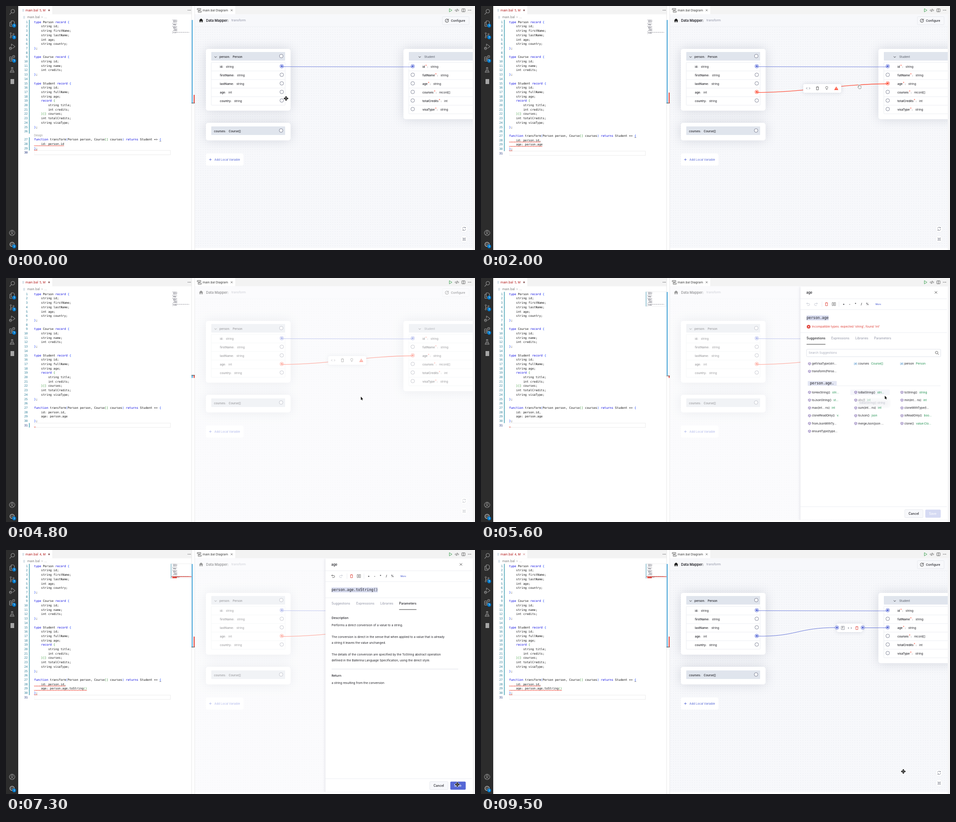
These frames come from a looping animation (1035 px wide and 541 px high, 9600 ms). An HTML page with a canvas:

```html
<!DOCTYPE html>
<html lang="en">
<head>
<meta charset="utf-8">
<title>Data Mapper</title>
<style>
html, body { margin: 0; width: 100%; height: 100%; overflow: hidden; background: #fff; }
canvas { display: block; width: 1035px; height: 541px; }
</style>
</head>
<body>
<canvas id="stage"></canvas>
<script>
const LOOP = 9600, W = 1035, H = 541;
const SANS = 'Inter, sans-serif', MONO = '"DejaVu Sans Mono", monospace';
const BLUE = '#5567d5', RED = '#fe523c', CYAN = '#36b4e0', INK = '#222228', GREY = '#8d91a3', GREEN = '#1d8f4e';
const canvas = document.getElementById('stage'), c = canvas.getContext('2d');
const dpr = window.devicePixelRatio || 1;
canvas.width = W * dpr;
canvas.height = H * dpr;

const RECORDS = `type Person record {
    string id;
    string firstName;
    string lastName;
    int age;
    string country;
};

type Course record {
    string id;
    string name;
    int credits;
};

type Student record {
    string id;
    string fullName;
    string age;
    record {
        string title;
        int credits;
    }[] courses;
    int totalCredits;
    string visaType;
};

function transform(Person person, Course[] courses) returns Student => {
    id: person.id`;
const CODE = ['', ',\n    age: person.age', ',\n    age: person.age.toString()']
  .map(tail => (RECORDS + tail + '\n};\n').split('\n'));

const during = (t, a, b) => t >= a && t < b;
const ramp = (t, a, b) => Math.min(1, Math.max(0, (t - a) / (b - a)));
const ease = p => p * p * (3 - 2 * p);

// ---- drawing helpers ----
function rect(x, y, w, h, fill, r = 0, stroke) {
  c.beginPath();
  c.roundRect(x, y, w, h, r);
  if (fill) { c.fillStyle = fill; c.fill(); }
  if (stroke) { c.strokeStyle = stroke; c.lineWidth = .7; c.stroke(); }
}
function text(s, x, y, { size = 6.4, color = INK, weight = 400, font = SANS, align = 'left' } = {}) {
  c.font = `${weight} ${size}px ${font}`;
  c.fillStyle = color;
  c.textAlign = align;
  c.fillText(s, x, y + size * .35);
  return x + c.measureText(s).width;
}
function line(x1, y1, x2, y2, color = '#e3e5ec', width = .7) {
  c.beginPath();
  c.moveTo(x1, y1);
  c.lineTo(x2, y2);
  c.strokeStyle = color;
  c.lineWidth = width;
  c.stroke();
}
function circle(x, y, r, fill, stroke, width = .9) {
  c.beginPath();
  c.arc(x, y, r, 0, 7);
  if (fill) { c.fillStyle = fill; c.fill(); }
  if (stroke) { c.strokeStyle = stroke; c.lineWidth = width; c.stroke(); }
}
function icon(x, y, d, { stroke, fill, width = .9 }) {
  const path = new Path2D(d);
  c.save();
  c.translate(x, y);
  c.lineWidth = width;
  if (stroke) { c.strokeStyle = stroke; c.stroke(path); }
  if (fill) { c.fillStyle = fill; c.fill(path); }
  c.restore();
}
function shadowBox(x, y, w, h, r, blur = 24) {
  c.save();
  c.shadowColor = 'rgba(90,98,125,.22)';
  c.shadowBlur = blur * dpr;
  rect(x, y, w, h, '#fff', r);
  c.restore();
}
function curve(x1, y1, cx1, cx2, x2, y2, color, width = .9) {
  c.beginPath();
  c.moveTo(x1, y1);
  c.bezierCurveTo(cx1, y1 + 1.5, cx2, y2, x2, y2);
  c.strokeStyle = color;
  c.lineWidth = width;
  c.stroke();
}

const D = {
  cross: 'M-2-2L2 2M2-2L-2 2',
  angles: 'M-2-2L-4 0L-2 2M2-2L4 0L2 2',
  trash: 'M-3-2.8H3M-1-3.6H1M-2.2-2.6V3.4H2.2V-2.6',
  bulb: 'M-1.2 1.8C-1.2.6-2.4 0-2.4-1.3A2.4 2.4 0 0 1 2.4-1.3C2.4 0 1.2.6 1.2 1.8ZM-1.2 3.3H1.2',
  warn: 'M0-4L4.6 3.8H-4.6Z',
  chevron: 'M-2.4-1.2L0 1.2L2.4-1.2',
  undo: 'M-1.5-3.5L-3.5-1.5L-1.5.5M-3.5-1.5H1A2.2 2.2 0 0 1 1 3H-2',
  redo: 'M1.5-3.5L3.5-1.5L1.5.5M3.5-1.5H-1A2.2 2.2 0 0 0-1 3H2',
  cube: 'M0-3L2.7-1.5V1.5L0 3L-2.7 1.5V-1.5ZM-2.7-1.5L0 0L2.7-1.5M0 0V3',
  files: 'M-2-6H3L5-4V3H-2ZM-2-3H-5V6H2V3',
  branch: 'M-3-3V3M3-1C3 2-3 0-3 3M-3-6a1.5 1.5 0 1 0 .01 0M-3 3a1.5 1.5 0 1 0 .01 0M3-4a1.5 1.5 0 1 0 .01 0',
  debug: 'M-2-1V-6L6 0L0 4M-4 1a2.4 2.4 0 0 1 2.4 2.4v1a2.4 2.4 0 0 1-4.8 0v-1A2.4 2.4 0 0 1-4 1M-7 3.5H-1',
  blocks: 'M-5-3H0V6H-5ZM-5 1.5H5V6H0M2-6H6V-2H2Z',
  flask: 'M-2-5.5H2M-1.3-5.5V-1L-4.6 5H4.6L1.3-1V-5.5M-3 2H3',
  home: 'M-4.6 0L0-4.2L4.6 0H3.3V4H1V1H-1V4H-3.3V0Z',
  refresh: 'M-3.4-.6A3.4 3.4 0 0 1 2.6-2.4M3.4.6A3.4 3.4 0 0 1-2.6 2.4M3-4V-2H1M-3 4V2H-1',
  shrink: 'M-3.5-3.5L-1-1V-3M-1-1H-3M3.5-3.5L1-1V-3M1-1H3M-3.5 3.5L-1 1V3M-1 1H-3M3.5 3.5L1 1V3M1 1H3'
};

// ---- editor ----
function sideBar(dirty) {
  rect(0, 0, 27, H, '#2c2c2c');
  const look = { stroke: '#a5a5a5', width: 1 };
  circle(15, 11.5, 4, null, '#a5a5a5', 1);
  line(12, 14.5, 8, 19, '#a5a5a5', 1.1);
  icon(13.5, 39, D.files, look);
  icon(13.5, 65, D.branch, look);
  icon(14, 90, D.debug, look);
  icon(13, 116, D.blocks, look);
  icon(13.5, 142, D.flask, look);
  rect(10, 162, 8, 11, '#a5a5a5');
  circle(13.5, 503, 6, null, '#a5a5a5', 1);
  circle(13.5, 501, 2.3, null, '#a5a5a5', 1);
  icon(13.5, 507, 'M-4 1C-3-3 3-3 4 1', look);
  circle(13.5, 528.5, 4.6, null, '#a5a5a5', 1.8);
  circle(13.5, 528.5, 1.8, null, '#a5a5a5', 1);
  for (const y of [43.5, 69.5, 121.5, 533]) {
    if (y < 50 && !dirty) continue;
    circle(18, y, 4.2, '#007acc');
    text('1', 18, y, { size: 5.2, color: '#fff', weight: 600, align: 'center' });
  }
}
function fileIcon(x, y) {
  for (const dy of [-2, 0, 2]) line(x - 2, y + dy, x + 2, y + dy, '#a9bfd0', .8);
}
function codeLine(s, x, y, state) {
  for (const { 0: part, index } of s.matchAll(/\w+|[{}()[\]]|[^\w\s{}()[\]]+/g)) {
    let color = /^(type|record|function|returns)$/.test(part) ? '#0000e0' : '#111';
    if (/[})\]]/.test(part)) state.depth--;
    if (/[{}()[\]]/.test(part)) color = state.depth ? '#319331' : '#0431fa';
    if (/[{([]/.test(part)) state.depth++;
    text(part, x + index * 3.895, y, { size: 6.47, color, font: MONO });
  }
}
function squiggle(x1, x2, y) {
  c.beginPath();
  for (let x = x1, i = 0; x <= x2; x += 1.2, i++) c.lineTo(x, y + (i % 2 ? .7 : -.7));
  c.strokeStyle = '#e51400';
  c.lineWidth = .7;
  c.stroke();
}
function editor(t) {
  const lines = CODE[t < 1700 ? 0 : t < 6500 ? 1 : 2], last = lines.length;
  const dirty = t < 2700 || during(t, 4500, 9300);
  const fresh = during(t, 4500, 4900), clean = during(t, 4500, 6500);
  const lens = t < 1700 ? 8.3 : 0;
  const lineY = i => 35.5 + (i - 1) * 9.7 + (i > 26 ? lens : 0);

  sideBar(dirty);
  rect(27, 0, 383, 18.5, '#f3f3f3');
  rect(27, 0, 75, 18.5, '#fff');
  fileIcon(38, 9.5);
  text('main.bal', 43, 9.5, { size: 7, color: '#b01011' });
  text(t < 6500 ? '5, M' : '4, M', 74, 9.5, { size: 6.4, color: '#b01011' });
  if (dirty) circle(95, 9.5, 2, '#9c7272');
  else icon(95, 9.5, D.cross, { stroke: '#c07070', width: .8 });
  text('···', 404.5, 9.5, { size: 8, weight: 700, align: 'center' });
  fileIcon(40, 25);
  text('main.bal  ›  ...', 47, 25, { size: 6.9, color: '#777' });

  rect(62, lineY(last) - 4.8, 301, 9.5, null, 0, '#e4e4e4');
  rect(61, lineY(last) - 6, 1.4, 12, '#fff');
  const state = { depth: 0 };
  lines.forEach((s, k) => {
    const n = k + 1, y = lineY(n);
    text(n, 48, y, { size: 6.47, color: n === last ? '#0b216f' : '#237893', font: MONO, align: 'right' });
    if (fresh ? n === last : n < last) rect(50.7, y - 4.85, 1.6, 9.75, '#4aa3b5');
    codeLine(s, 62, y, state);
    for (const { 0: word, index } of s.matchAll(/\S+/g))
      rect(367 + index * .53, 30.6 + k * 1.05, word.length * .53, .65, '#7d7d88');
    if (n > 27 && n < last && !clean && !during(t, 7400, 8000))
      squiggle(62, 62 + s.length * 3.895, y + 4.2);
  });
  if (lens) text('Design', 62, 287, { size: 5.8, color: '#919191' });
  if (clean) squiggle(62, 66, lineY(last) + 4);
  else line(338.5, lineY(27) + 4, 342.5, lineY(27) + 4, '#555');

  // minimap marks and overview ruler
  if (t >= 2700 && !fresh) {
    rect(364.3, 30.5, 45, 32, null, 0, '#e8e8ea');
    line(364.3, 30.5, 364.3, 63, '#3793b0', .9);
    if (!clean && !during(t, 7400, 8000)) {
      rect(365, 58.6, 45, 1.2, '#e03a30');
      rect(367, 60.5, 10, 1.8, '#e51400');
    }
  }
  line(409.7, 0, 409.7, H, '#ddd');
  line(416.6, 0, 416.6, H, '#ddd');
  if (fresh) {
    rect(409.5, 215.5, 3, 6, '#5fb0dc');
    rect(414, 215.5, 2.3, 6, '#e04a40');
    line(409.5, 215.7, 416.5, 215.7, '#333', 1);
  } else {
    rect(409.7, 31, 2.5, 185, '#62b3e0');
    const top = clean ? 217 : t < 1700 ? 197 : 192;
    rect(414, top, 2.4, clean ? 4.5 : 215 - top, '#e8574e');
    line(409.5, clean ? 217 : 215.2, 416.5, clean ? 217 : 215.2, '#333', 1);
  }
}

// ---- diagram ----
function port(x, y, color) {
  circle(x, y, 4, '#fff', color || '#70748a');
  if (color) circle(x, y, 2.3, color);
}
function topBar() {
  rect(417, 0, 618, 18.5, '#f3f3f3');
  rect(417, 0, 89, 18.5, '#fff');
  rect(422, 5.5, 8, 3, null, .5, '#222');
  rect(424, 11, 7, 3, null, .5, '#222');
  line(426, 8.5, 426, 11, '#222');
  text('main.bal Diagram', 434, 9.5, { size: 6.8, color: '#333' });
  icon(498, 9.5, D.cross, { stroke: '#444', width: .8 });
  icon(981, 9.5, 'M-2.6-3.6L3.2 0L-2.6 3.6Z', { stroke: '#38a04d' });
  icon(995, 9.5, D.angles + 'M1-3.2L-1 3.2', { stroke: '#333' });
  rect(1006, 6.2, 7, 6.6, null, .5, '#333');
  line(1009.5, 6.2, 1009.5, 12.8, '#333');
  text('···', 1023, 9.5, { size: 8, weight: 700, align: 'center' });
}
function fieldRows(x, w, rows, y = 125, pitch = 19) {
  rect(x, y, w, rows * pitch, null, 1, '#e3e5ec');
  for (let i = 1; i < rows; i++) line(x, y + i * pitch, x + w, y + i * pitch);
}
function cards(t) {
  const ageColor = during(t, 700, 1700) ? CYAN : during(t, 1700, 7500) ? RED : t >= 7500 ? BLUE : null;
  const bold = { weight: 500 };

  shadowBox(441, 95, 187, 137, 5);
  rect(453, 102, 163, 19, '#e0e5ed', 1);
  icon(462.5, 113, D.chevron, { stroke: INK });
  text('Person', text('person:', 471, 113, bold) + 6, 113, bold);
  fieldRows(453, 163, 5);
  port(607.5, 111);
  [['id', 'string'], ['firstName', 'string'], ['lastName', 'string'], ['age', 'int'], ['country', 'string']]
    .forEach(([name, type], i) => {
      const y = 135 + i * 19;
      text(type, text(name + ':', 472, y, bold) + 5.8, y);
      port(608.5, y - 1.5, i === 0 ? BLUE : i === 3 ? ageColor : null);
    });

  shadowBox(441, 259, 187, 39, 5);
  rect(453, 267, 163, 19, '#e0e5ed', 1);
  text('Course[]', text('courses:', 459, 278, bold) + 6, 278, bold);
  port(607, 276);

  rect(441, 327, 83, 27, '#fff', 4);
  icon(451, 340.5, 'M-2.7 0H2.7M0-2.7V2.7', { stroke: BLUE });
  text('Add Local Variable', 460, 340.5, { color: BLUE });

  shadowBox(877, 95, 170, 156, 5);
  rect(889, 102, 146, 19, '#e0e5ed', 1);
  icon(913, 113, D.chevron, { stroke: INK });
  text('Student', 923, 113, { color: '#555a66' });
  fieldRows(889, 150, 6);
  [['id', 'string'], ['fullName', 'string'], ['age', 'string'], ['courses', 'record[]'], ['totalCredits', 'int'], ['visaType', 'string']]
    .forEach(([name, type], i) => {
      const y = 135 + i * 19;
      const star = text('*', text(name, 919, y, bold) + .7, y - 1, { color: RED, size: 7 });
      text(type, text(':', star + .6, y, bold) + 5.8, y);
      port(897.5, y - 1.5, i === 0 ? BLUE : i === 2 && t >= 1300 ? ageColor : null);
    });
}
function errorPopup() {
  shadowBox(714, 200.5, 140, 77, 3, 9);
  icon(784, 198.5, 'M-4 2.5L0-2L4 2.5Z', { fill: '#fff' });
  icon(728, 214, D.warn, { fill: RED });
  line(728, 212, 728, 215, '#fff', .9);
  const red = { color: '#e0443c', font: MONO, size: 6.4 };
  text('incompatible types: expected', 722, 224, red);
  text("'string', found 'int'", 722, 233, red);
  line(722, 241, 846, 241);
  text('person.age', 722, 249, { font: MONO, weight: 700, size: 6.4 });
  icon(727, 262, 'M-2.2-2.2L2.4 2.4', { stroke: BLUE, width: 1.6 });
  text('Fix by editing expression', 734, 261.7, { color: BLUE, size: 6 });
}
function links(t, pointer) {
  line(608.5, 134.5, 897, 135, BLUE, .8);
  if (during(t, 700, 1700)) {
    const there = t >= 1300;
    const [x, y] = there ? [897, 173.5] : [pointer.x, pointer.y];
    const mid = (608.5 + x) / 2;
    curve(608.5, 191, mid, mid, x, y, CYAN);
    if (there) {
      rect(695, 178, 20, 20, '#fff', 3);
      text('.', 705, 188, { color: CYAN, align: 'center' });
    }
  } else if (during(t, 1700, 7500)) {
    curve(608.5, 191.5, 695, 800, 897, 172.5, RED, 1.4);
    if (t >= 2000) {
      shadowBox(711, 173, 84, 19.5, 4, 10);
      icon(722, 182.5, D.angles, { stroke: '#666a7a' });
      icon(742.5, 182.5, D.trash, { stroke: '#555' });
      icon(763, 182, D.bulb, { stroke: '#555', width: .8 });
      icon(784, 182.5, D.warn, { fill: RED });
      line(784, 181, 784, 184, '#fff', .9);
    }
  } else if (t >= 8000) {
    curve(608.5, 191, 697, 697, 785, 172, BLUE);
    line(842, 172.5, 897, 172.5, BLUE, .9);
    shadowBox(785, 163, 57, 19, 4, 10);
    port(785.5, 172, BLUE);
    port(842.5, 172, BLUE);
    rect(795, 169, 7, 7.5, null, .5, '#666a7a');
    text('E', 798.5, 172.7, { size: 5, align: 'center' });
    icon(814, 173, D.angles, { stroke: '#666a7a' });
    icon(829.5, 173, D.trash, { stroke: '#e0443c' });
  } else if (t >= 7500) {
    curve(608.5, 191, 697, 800, 897, 172.5, BLUE);
  }
}
function diagram(t, pointer) {
  rect(417, 18.5, 613, 518, '#f7f8fb');
  c.save();
  c.beginPath();
  c.rect(417, 18.5, 613, 518);
  c.clip();
  c.beginPath();
  for (let y = 48; y < 537; y += 5.2) { c.moveTo(419, y); c.lineTo(1030, y); }
  c.setLineDash([.9, 4.3]);
  c.strokeStyle = '#d9dce4';
  c.lineWidth = .9;
  c.stroke();
  c.setLineDash([]);
  line(417, 45.5, 1030, 45.5, '#eceef3');

  icon(430.5, 32, D.home, { fill: '#111' });
  text('Data Mapper:', 441.5, 32, { size: 7.6, weight: 600 });
  text('transform', 497.5, 32, { size: 6.9, color: GREY });
  rect(963, 23.5, 59, 18, '#f7f8fb', 2, '#e0e2e9');
  circle(973, 32.5, 3.7, null, '#333');
  line(972, 33.5, 977, 28.5, '#333', 1);
  text('Configure', 982, 32.5, { size: 6.6, weight: 500 });

  cards(t);
  links(t, pointer);
  if (during(t, 2500, 4500)) errorPopup();
  for (const [y, d] of [[494, D.refresh], [517, D.shrink]]) {
    circle(1011, y, 8, '#fff', '#e9ebf1', .7);
    icon(1011, y, d, { stroke: '#666a7a', width: .8 });
  }
  const fade = .55 * Math.min(ramp(t, 4500, 4700), 1 - ramp(t, 7400, 7500));
  if (fade) rect(417, 18.5, 613, 518, `rgba(255,255,255,${fade})`);
  const slide = t < 7400 ? 1 - (1 - ramp(t, 4880, 5120)) ** 3 : 1 - ramp(t, 7380, 7500);
  if (slide > 0) {
    c.translate(325 * (1 - slide), 0);
    panel(t);
  }
  c.restore();

  rect(1030, 18.5, 5, H, '#f4f4f5');
  if (during(t, 800, 1600)) {
    rect(1030, 18.5, 5, 518, '#dcdcdd');
    rect(417, 536.5, 613, 4.5, '#c8c8c9');
  }
}

// ---- expression panel ----
function suggestion(s, col, y, variable) {
  const x = [721, 823, 925][col], [name, type] = s.split('|');
  if (variable) text('[ø]', x, y, { size: 5.5, color: '#2b7cc0' });
  else icon(x + 4, y, D.cube, { stroke: '#6a4fa3', width: .7 });
  const end = text(name, x + 9.3, y);
  if (type) text(type, end + 4.5, y, { color: GREEN });
}
function suggestions(t) {
  rect(718.5, 158, 296, 16.5, '#fff', 2, '#d5d8e2');
  text('Search Suggestions', 723, 166, { color: '#a7abba', size: 6.6 });
  circle(1005.5, 165.3, 2.8, null, '#555');
  line(1007.5, 167.3, 1010, 170, '#555', 1);
  suggestion('getVisaType(stri...', 0, 190);
  suggestion('courses|Course[]', 1, 190, true);
  suggestion('person|Person', 2, 190, true);
  suggestion('transform(Perso...', 0, 207);
  rect(721, 228.5, 64, 10.5, '#e3e6f3', 1);
  text('person.age.', 726, 233.5, { size: 8, font: MONO });
  line(785, 239, 1014, 239);
  const hover = during(t, 5400, 5700) ? 815 : during(t, 5700, 6400) ? 917 : 0;
  if (hover) rect(hover, 247.5, 87, 12, '#f5f6fa', 1);
  ['toHexString()|stri...', 'toBalString()|stri...', 'toString()|string',
    'toJsonString()|st...', 'abs()|int', 'min(int... ns)|int',
    'max(int... ns)|int', 'sum(int... ns)|int', 'cloneWithType(t...',
    'cloneReadOnly()|v.', 'toJson()|json', 'isReadOnly()|boo...',
    'fromJsonWithTy...', 'mergeJson(json ...', 'clone()|value:Clo...', 'ensureType(type...'
  ].forEach((s, i) => suggestion(s, i % 3, 253.5 + Math.floor(i / 3) * 17.25));
  const tip = Math.min(ramp(t, 5500, 5700), 1 - ramp(t, 5700, 5800));
  if (tip) {
    c.globalAlpha = tip;
    shadowBox(831, 269, 70, 16, 2, 5);
    text('toBalString() string', 835, 277, { color: GREY });
    c.globalAlpha = 1;
  }
}
function parameters() {
  const head = { weight: 500, size: 6.8 };
  text('Description', 718.5, 150.5, head);
  ['Performs a direct conversion of a value to a string.', '',
    'The conversion is direct in the sense that when applied to a value that is already',
    'a string it leaves the value unchanged.', '',
    'The details of the conversion are specified by the ToString abstract operation',
    'defined in the Ballerina Language Specification, using the direct style.'
  ].forEach((s, i) => text(s, 718.5, 167 + i * 12.9, { size: 6.6 }));
  line(718.5, 264, 998, 264, '#cfd2dc');
  text('Return', 718.5, 278.5, head);
  text('a string resulting from the conversion', 718.5, 294.5, { size: 6.6 });
}
function panel(t) {
  const done = t >= 6500, shift = done ? -15 : 0;
  shadowBox(705, 18.5, 330, 523, 0, 6);
  text('age', 718, 32, { size: 7.4, weight: 500 });
  icon(1004, 32, 'M-2.7-2.7L2.7 2.7M2.7-2.7L-2.7 2.7', { stroke: '#555' });
  line(705, 46, 1028, 46);
  icon(722, 58, D.undo, { stroke: done ? '#555' : '#c5c8d2' });
  icon(739, 58, D.redo, { stroke: '#c5c8d2' });
  icon(762.5, 58, D.trash, { stroke: '#e0443c' });
  rect(775, 54.3, 2.8, 7, null, .5, '#444');
  rect(779.5, 54.3, 2.8, 7, null, .5, '#444');
  line(752.5, 52, 752.5, 64);
  line(790, 52, 790, 64);
  [...'+-*/%'].forEach((s, i) => text(s, 800.5 + i * 13, 58, { size: 6.6, weight: 600, align: 'center' }));
  text('More', 870.5, 58, { size: 5, color: BLUE, weight: 500 });
  line(705, 70, 1028, 70);
  const expression = 'person.age' + (done ? '.toString()' : '');
  rect(718.5, 83, expression.length * 4.86, 11, '#d8dcef');
  text(expression, 718.5, 88, { size: 8.08, font: MONO });
  if (!done) {
    circle(723, 108, 4.1, '#e0443c');
    icon(723, 108, 'M-1.5-1.5L1.5 1.5M1.5-1.5L-1.5 1.5', { stroke: '#fff' });
    text("Incompatible types: expected 'string', found 'int'", 730, 108, { size: 6.6, color: '#e0443c' });
  }
  line(705, 121 + shift, 1028, 121 + shift);
  [['Suggestions', 718.5], ['Expressions', 773], ['Libraries', 826], ['Parameters', 867.5]].forEach(([s, x], i) => {
    const active = i === (done ? 3 : 0);
    const end = text(s, x, 134 + shift, { size: 7, color: active ? INK : GREY, weight: active ? 500 : 400 });
    if (active) line(x, 147 + shift, end, 147 + shift, '#333', 1);
  });
  if (done) parameters(); else suggestions(t);
  line(705, 507, 1028, 507);
  rect(935, 513.5, 40.5, 18, '#f7f8fb', 2, '#e0e2e9');
  text('Cancel', 955, 522.5, { size: 7, weight: 500, align: 'center' });
  rect(980.5, 513.5, 34, 18, done ? BLUE : '#d5daf3', 2);
  text('Save', 997, 522.5, { size: 7, weight: 500, color: '#fff', align: 'center' });
}

// ---- pointer: time, x, y ----
const ROUTE = [
  [0, 618, 205], [100, 618, 205], [500, 608, 190], [700, 608, 190], [1300, 899, 172], [1650, 899, 172],
  [2300, 784, 183], [2700, 784, 183], [2900, 822, 228], [3200, 815, 241], [3750, 814, 241], [4300, 783, 263],
  [5300, 783, 263], [5600, 891, 261], [6000, 958, 256], [6500, 958, 256], [7200, 996, 520], [8550, 996, 519],
  [8900, 932, 491], [9600, 932, 491]
];
const SHAPES = {
  move: { d: 'M-4 0H4M0-4V4M-4.4 0l1.5-1.2v2.4ZM4.4 0l-1.5-1.2v2.4ZM0-4.4l-1.2 1.5h2.4ZM0 4.4l-1.2-1.5h2.4Z', width: 1.3 },
  arrow: { d: 'M0 0V7.5L1.8 6L3 8.5L4 8L2.9 5.6H5.2Z', fill: true },
  hand: { d: 'M-.8-3V1.5L-2.4.3L-3 1.2L-.8 5H3.3L4.2 1V-.3L.8-1V-3Z', fill: true },
  beam: { d: 'M-1.8-4Q0-4 0-3Q0-4 1.8-4M0-3V3M-1.8 4Q0 4 0 3Q0 4 1.8 4', width: .9 }
};
function pointerAt(t) {
  const i = ROUTE.findIndex(p => p[0] > t), [t0, x0, y0] = ROUTE[i - 1], [t1, x1, y1] = ROUTE[i];
  const p = ease(ramp(t, t0, t1));
  const kind = during(t, 500, 2800) || during(t, 4200, 4600) || during(t, 6000, 6600) ? 'hand'
    : during(t, 2800, 4200) ? 'beam' : during(t, 4600, 7100) ? 'arrow' : 'move';
  return { x: x0 + (x1 - x0) * p, y: y0 + (y1 - y0) * p, kind };
}
function drawPointer({ x, y, kind }) {
  const { d, fill, width = 1.3 } = SHAPES[kind];
  icon(x, y, d, { stroke: '#fff', width: width + 1 });
  icon(x, y, d, fill ? { fill: '#111' } : { stroke: '#111', width });
  if (kind === 'hand') icon(x, y, d, { fill: '#fff', stroke: '#111', width: .8 });
}

function frame(now) {
  const t = now % LOOP, pointer = pointerAt(t);
  c.setTransform(dpr, 0, 0, dpr, 0, 0);
  rect(0, 0, W, H, '#fff');
  editor(t);
  topBar();
  diagram(t, pointer);
  drawPointer(pointer);
  requestAnimationFrame(frame);
}
requestAnimationFrame(frame);
</script>
</body>
</html>
```
